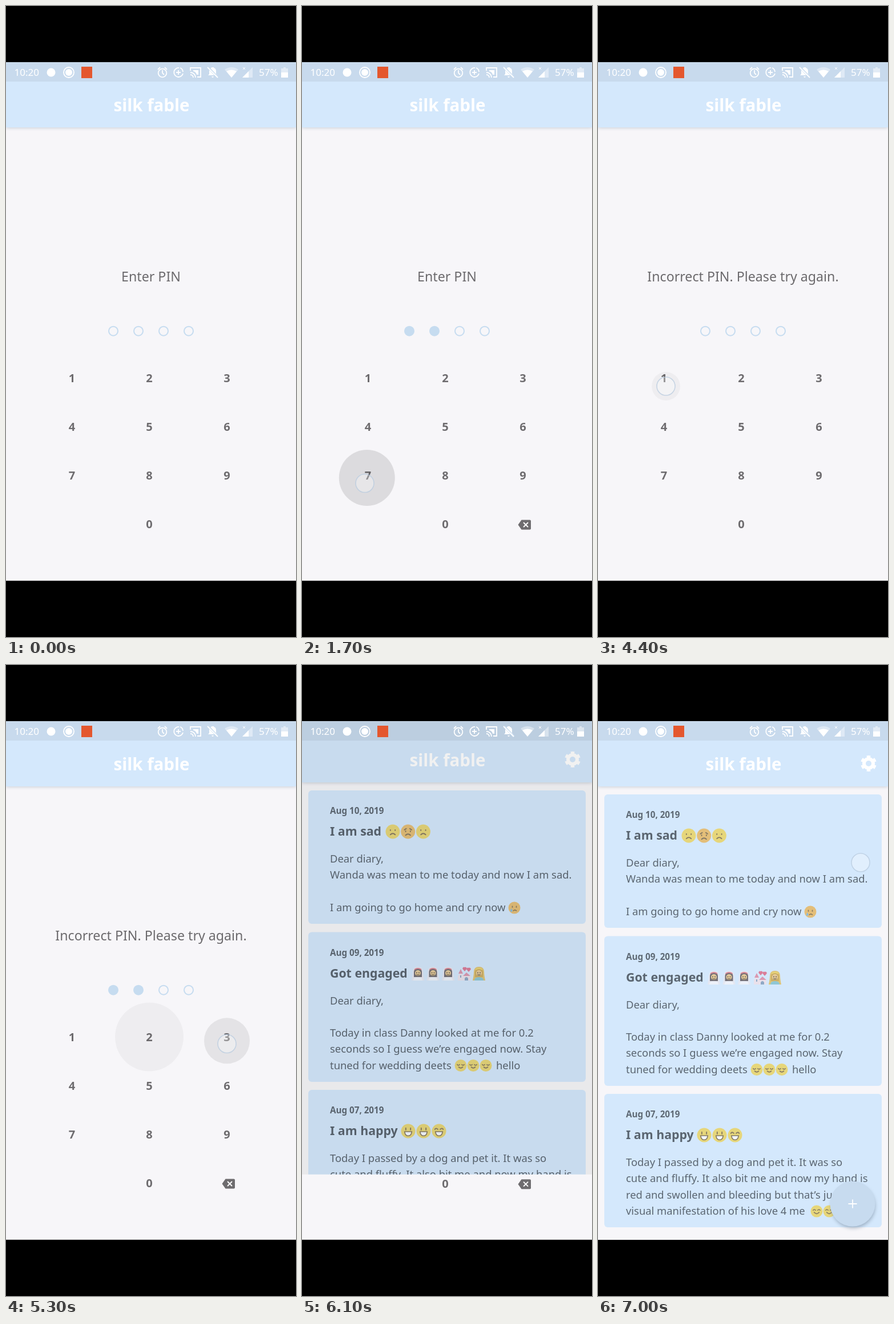
An HTML page for the animation above (7.1 s loop, 508 by 1102 pixels).

```html
<!DOCTYPE html>
<html lang="en">
<head>
<meta charset="utf-8">
<title>PIN lock</title>
<style>
html, body { margin: 0; width: 100%; height: 100%; overflow: hidden; background: #000; }
svg { display: block; font-family: "Noto Sans", sans-serif; }
.mid { text-anchor: middle; }
.line { fill: none; stroke: #fff; stroke-width: 1.8; }
.app { font-size: 29.5px; font-weight: 700; fill: #fff; }
.prompt { font-size: 23.2px; fill: #6c6a6d; }
.key { font-size: 20px; font-weight: 600; fill: #6e6c6f; }
.date { font-size: 15.2px; font-weight: 600; fill: #5e6974; }
.head { font-size: 21.3px; font-weight: 600; fill: #5a6570; }
.body { font-size: 18.4px; fill: #5b6671; }
.emoji { opacity: .75; }
.features { fill: none; stroke: #6b5531; stroke-width: 1.8; stroke-linecap: round; }
.open { fill: #fff; stroke: #6b5531; stroke-width: 1.5; }
</style>
</head>
<body>
<svg id="stage" width="508" height="1102" viewBox="0 0 508 1102"></svg>
<script>
const BLUE = '#d4e8fc', PAPER = '#f7f6f9', DOT = '#c6dcf0';
const LOOP = 7100, STEP = 100, REJECT = 2400, OPEN = 6000;
const COLS = [115.5, 251, 387], ROWS = [649.5, 734.5, 819.5, 904.5];

const rect = (x, y, w, h, fill, more = '') =>
  `<rect x="${x}" y="${y}" width="${w}" height="${h}" fill="${fill}" ${more}/>`;
const circle = (x, y, r, fill, more = '') =>
  `<circle cx="${x}" cy="${y}" r="${r}" fill="${fill}" ${more}/>`;
const path = (d, more = 'fill="#fff"') => `<path d="${d}" ${more}/>`;
const text = (x, y, cls, s, more = '') =>
  `<text x="${x}" y="${y}" class="${cls}" ${more}>${s}</text>`;

const header = () =>
  rect(0, 208, 508, 4, '#8090a0', 'filter="url(#soft)" opacity=".6"') +
  rect(0, 60, 508, 152, BLUE) + text(255, 184, 'app mid', 'silk fable');

// Emoji features on a 24 x 24 face.
const stroke = d => path(d, 'class="features"');
const mouth = path('M6 13h12q-1 7-6 7t-6-7z', 'class="open"');
const MOODS = {
  frown: stroke('M8 9v1M16 9v1M8 17q4-4 8 0'),
  worry: stroke('M6 9l3-2M18 9l-3-2M8 11v1M16 11v1M8 18q4-4 8 0'),
  cry: stroke('M8 9v2M16 9v2M10 18q3-3 6 0') + path('M6 13q-4 7 0 7t0-7', 'fill="#6aaede"'),
  calm: stroke('M5 10q2 3 5 0M14 10q3 3 5 0M8 15q4 4 8 0'),
  blush: stroke('M5 10q2-3 5 0M14 10q3-3 5 0M7 14q5 6 10 0'),
  grin: stroke('M8 7v3M16 7v3') + mouth,
  joy: stroke('M5 9q2-3 5 0M14 9q3-3 5 0') + mouth
};
const place = (x, y, r, art) =>
  `<g class="emoji" transform="translate(${x - r} ${y - r}) scale(${r / 12})">${art}</g>`;
const face = (x, y, r, mood) => place(x, y, r,
  circle(12, 12, 12, /worry|cry/.test(mood) ? '#e8b04e' : '#edd04f') + MOODS[mood]);
const woman = (x, veil) => place(x, 546, 12,
  path('M1 24Q3 14 3 9q0-9 9-9t9 9q0 5 2 15z', `fill="${veil ? '#eae7ee' : '#e0b84e'}"`) +
  path('M5 18V9q0-6 7-6t7 6v9z', `fill="${veil ? '#554a4c' : '#c99b35'}"`) +
  path('M4 24q0-6 8-6t8 6z', `fill="${veil ? '#f6f5f8' : '#78bcc9'}"`) +
  circle(12, 11, 5, '#ecc27b') + stroke('M10 10v1M14 10v1M10 14q2 1 4 0') +
  path('M6 5q6-4 12 0', `fill="none" stroke="${veil ? '#d86570' : '#f0d24c'}" stroke-width="2"`));
const heart = (x, y) => path(`M${x} ${y}l-3.500-4a2.400 2.400 0 0 1 3.500-3a2.400 2.400 0 0 1 3.500 3z`, 'fill="#dc5a78"');
const chapel = place(284, 546, 12,
  rect(1, 15, 22, 9, '#f0dfe6') + rect(3, 11, 6, 13, '#f0dfe6') +
  path('M2 12l4-8 4 8zM10 16l6-6 7 6z', 'fill="#dd7f98"') +
  path('M13 24v-4q3-4 6 0v4zM5 19v-4h2v4z', 'fill="#7894b5"') + heart(13, 8) + heart(20, 9));

const card = (y, h, date, title, lines) =>
  rect(11, y, 486, h, BLUE, 'rx="6"') + text(49, y + 41, 'date', date) + text(49, y + 79, 'head', title) +
  lines.map((s, i) => text(49, y + 126 + i * 28.3, 'body', s)).join('');

const diary = () => rect(0, 98, 508, 960, PAPER) + header() +
  circle(474, 172, 8, 'none', 'stroke="#fff" stroke-width="6"') +
  circle(474, 172, 12, 'none', 'stroke="#fff" stroke-width="4" pathLength="12" stroke-dasharray="1" transform="rotate(15 474 172)"') +
  card(226, 233, 'Aug 10, 2019', 'I am sad', ['Dear diary,',
    'Wanda was mean to me today and now I am sad.', '', 'I am going to go home and cry now']) +
  card(473.5, 261.5, 'Aug 09, 2019', 'Got engaged', ['Dear diary,', '',
    'Today in class Danny looked at me for 0.2', 'seconds so I guess we’re engaged now. Stay', 'tuned for wedding deets']) +
  text(340, 712.7, 'body', 'hello') +
  card(749, 233, 'Aug 07, 2019', 'I am happy', ['Today I passed by a dog and pet it. It was so',
    'cute and fluffy. It also bit me and now my hand is',
    'red and swollen and bleeding but that’s just a', 'visual manifestation of his love 4 me']) +
  ['frown', 'worry', 'frown'].map((m, i) => face(159 + i * 26.7, 298, 12.5, m)).join('') +
  ['grin', 'grin', 'joy'].map((m, i) => face(186 + i * 27, 821, 12.5, m)).join('') +
  [278, 300, 322].map(x => face(x, 706.5, 10.5, 'calm')).join('') +
  [383, 405].map(x => face(x, 954, 10.5, 'blush')).join('') +
  face(372, 431, 10.5, 'cry') + [203, 229.5, 256].map(x => woman(x, true)).join('') + chapel + woman(310, false) +
  circle(447, 945, 38.5, '#6f8296', 'filter="url(#soft)" opacity=".55"') + circle(446, 941, 39.5, '#c7dbef') +
  path('M438.5 941h15M446 933.5v15', 'class="line"');

const keypad = () => [1, 2, 3, 4, 5, 6, 7, 8, 9, 0].map(n => {
  const { x, y } = keyAt(n);
  return text(x, y + 7.5, 'key mid', n);
}).join('');

const statusBar = () => rect(0, 98, 508, 34, '#000', 'opacity=".06"') +
  text(14.5, 122, '', '10:20', 'font-size="17" fill="#fff"') +
  circle(79, 116, 7.5, '#fff') +
  circle(110, 116, 9, 'none', 'class="line"') + circle(110, 116, 6, '#fff') +
  rect(132, 106, 19, 20, '#e4572e') +
  circle(274, 117, 7.3, 'none', 'class="line"') +
  path('M274 112v5l3 3M266 111l4-4M282 111l-4-4', 'class="line"') +
  path('M303 108a8 8 0 1 0 7 10M305 108a8 8 0 0 1 5 7M298 116h8M302 112v8', 'class="line"') +
  path('M323 113v-5h18v16h-6M323 116a9 9 0 0 1 9 9M323 120a5 5 0 0 1 5 5', 'class="line"') +
  path('M328 112h9v8h-3q-1-5-6-6z') +
  path('M354 121l2-2v-5q0-5 4-6v-1h4v1q4 1 4 6v5l2 2zM360 123h4q-2 4-4 0z') +
  path('M355 108l16 17', 'stroke="#c7dbef" stroke-width="4"') + path('M353 107l18 18', 'class="line"') +
  path('M395 125l-12-14q12-8 24 0z', 'fill="#fff" opacity=".4"') + path('M395 125l-9-11q9-5 18 0z') +
  path('M414 125h18v-18z', 'fill="#fff" opacity=".4"') + path('M414 125h11v-11z') +
  path('M415 107l4 4M419 107l-4 4', 'stroke="#fff"') +
  text(443, 122, '', '57%', 'font-size="17" fill="#fff"') +
  path('M482 109h4v-2h4v2h4v8h-12z', 'fill="#fff" opacity=".5"') + rect(482, 116, 12, 9, '#fff');

function keyAt(n) {
  return n ? { x: COLS[(n - 1) % 3], y: ROWS[Math.floor((n - 1) / 3)] } : { x: COLS[1], y: ROWS[3] };
}

document.getElementById('stage').innerHTML = `
<defs>
  <filter id="soft" x="-20%" y="-200%" width="140%" height="500%"><feGaussianBlur stdDeviation="3"/></filter>
  <clipPath id="screen">${rect(0, 98.3, 508, 905.4, '#000')}</clipPath>
  <clipPath id="reveal"><rect id="revealBox" y="98" width="508"/></clipPath>
</defs>
<g clip-path="url(#screen)">
  ${rect(0, 98, 508, 906, PAPER)}${header()}
  <g id="lock">
    ${text(254, 481, 'prompt mid', '', 'id="prompt"')}
    ${[188, 232, 276, 320].map(x => circle(x, 567.7, 8, 'none', `class="dot" stroke="${DOT}" stroke-width="2"`)).join('')}
    ${keypad()}
    <g id="erase">${path('M378.500 906l6-8.500h14.500q2 0 2 2v13q0 2-2 2h-14.500z', 'fill="#6e6c6f"')}
      ${path('M388 902l8 8M396 902l-8 8', 'class="line"')}</g>
  </g>
  <g id="ripples"></g>
  <g id="diary" clip-path="url(#reveal)"><g id="slide">${diary()}</g>
    <rect id="dim" y="98" width="508" height="906"/></g>
  ${statusBar()}
  <g id="touch"></g>
</g>`;

const el = Object.fromEntries([...document.querySelectorAll('[id]')].map(e => [e.id, e]));
const dots = document.querySelectorAll('.dot');

// [press time, digit, finger offset x, y]
const PRESSES = [
  [900, 0, 3, 10], [1500, 7, -5.5, 14], [1800, 9, 2, 12], [2100, 4, 2, 10],
  [4400, 1, 3.5, 14.5], [4800, 2, 2, 12], [5200, 3, 0, 12], [5600, 4, 2, 10]
];
const RADIUS = [25, 40, 49, 56, 60, 60], SHADE = [.035, .08, .11, .11, .11, .035];

const pointer = (x, y) =>
  circle(x, y, 16, '#fff', 'fill-opacity=".3" stroke="#b9cbdf" stroke-opacity=".75" stroke-width="1.6"');

function draw(time) {
  let t = Math.floor(time / STEP) * STEP;
  if (t > 2600 && t < 4400) t = 2600; // the last ripple hangs until the next try

  let ripples = '', touch = t >= 6900 ? pointer(460, 345) : '', filled = 0;
  for (const [start, digit, dx, dy] of PRESSES) {
    const k = (t - start) / STEP;
    if (k >= 2 && (t < REJECT || start > REJECT)) filled++;
    if (k < 0 || k >= RADIUS.length || t > OPEN) continue;
    const { x, y } = keyAt(digit), away = (60 - RADIUS[k]) / 35;
    ripples += circle(x + dx * away, y + dy * away, RADIUS[k], '#000', `opacity="${SHADE[k]}"`);
    if (k <= 2) touch += pointer(x + dx, y + dy);
  }
  el.ripples.innerHTML = ripples;
  el.touch.innerHTML = touch;
  dots.forEach((d, i) => d.setAttribute('fill', i < filled ? DOT : 'none'));
  el.erase.style.display = filled ? '' : 'none';
  el.prompt.textContent = t < REJECT ? 'Enter PIN' : 'Incorrect PIN. Please try again.';

  const n = (t - OPEN) / STEP, opening = n >= 0;
  el.lock.setAttribute('transform', `translate(0 ${opening ? .7 : 0})`);
  el.diary.style.display = opening ? '' : 'none';
  if (!opening) return;
  el.revealBox.setAttribute('height', n < 3 ? 906 - 845 * Math.exp(-2 * n) : 906);
  el.slide.setAttribute('transform', `translate(0 ${n < 6 ? -19 * Math.exp(-n) : 0})`);
  el.dim.setAttribute('opacity', n < 8 ? .08 * Math.exp(-n / 2.5) : 0);
}

function tick() {
  draw(performance.now() % LOOP);
  requestAnimationFrame(tick);
}
tick();
</script>
</body>
</html>
```
